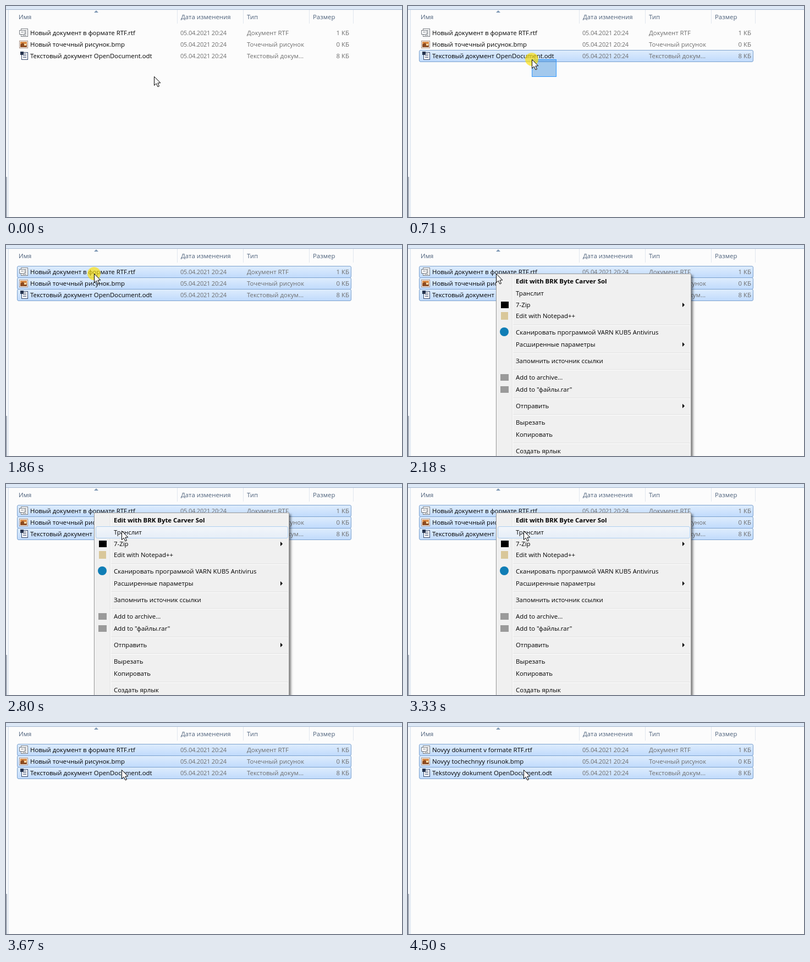
An HTML page with a canvas that plays this animation: 720 by 384 pixels, repeating every 8000 ms.

```html
<!DOCTYPE html>
<html lang="ru">
<head>
<meta charset="utf-8">
<title>Транслит</title>
<style>
html, body { margin: 0; width: 100%; height: 100%; overflow: hidden; background: #fcfcfc; }
canvas { display: block; width: 720px; height: 384px; }
</style>
</head>
<body>
<canvas id="stage" width="720" height="384"></canvas>
<script>
const c = document.getElementById('stage').getContext('2d');
const UI = '"Open Sans", "Noto Sans", sans-serif';
const LOOP = 8000;

const files = [
  ['Новый документ в формате RTF.rtf', 'Novyy dokument v formate RTF.rtf', 'Документ RTF', '1 КБ'],
  ['Новый точечный рисунок.bmp', 'Novyy tochechnyy risunok.bmp', 'Точечный рисунок', '0 КБ'],
  ['Текстовый документ OpenDocument.odt', 'Tekstovyy dokument OpenDocument.odt', 'Текстовый докум...', '8 КБ']
];
// label, centre y, icon, has submenu
const items = [
  ['Edit with BRK Byte Carver Sol', 66], ['Транслит', 88],
  ['7-Zip', 109, 'black', true], ['Edit with Notepad++', 129, 'note'],
  ['Сканировать программой VARN KUB5 Antivirus', 159, 'dot'],
  ['Расширенные параметры', 181, '', true], ['Запомнить источник ссылки', 211],
  ['Add to archive...', 241, 'box'], ['Add to "файлы.rar"', 263, 'box'],
  ['Отправить', 293, '', true], ['Вырезать', 323], ['Копировать', 345], ['Создать ярлык', 375]
];

const within = (t, a, b) => t >= a && t < b;
const mix = (a, b, k) => a + (b - a) * k;
const ease = k => (1 - Math.cos(Math.PI * k)) / 2;
// Progress 0..1 in n steps of 80 ms
const steps = (t, start, n) => Math.max(0, Math.min(n, Math.floor((t - start) / 80) + 1)) / n;

function rect(x, y, w, h, fill) {
  c.fillStyle = fill;
  c.fillRect(x, y, w, h);
}

function text(s, x, y, fill = '#000', opt = {}) {
  c.font = `${opt.bold ? 'bold ' : ''}${opt.size || 11.4}px ${opt.family || UI}`;
  c.textAlign = opt.align || 'left';
  c.letterSpacing = opt.spacing || '0px';
  c.fillStyle = fill;
  c.fillText(s, x, y);
}

function shape(points, fill) {
  c.beginPath();
  points.forEach(([x, y]) => c.lineTo(x, y));
  c.closePath();
  c.fillStyle = fill;
  c.fill();
}

function panel(x, y, w, h, top, bottom, line) {
  const g = c.createLinearGradient(0, y, 0, y + h);
  g.addColorStop(0, top);
  g.addColorStop(1, bottom);
  c.beginPath();
  c.roundRect(x + .5, y + .5, w, h, 2.5);
  c.fillStyle = g;
  c.fill();
  c.strokeStyle = line;
  c.lineWidth = 1;
  c.stroke();
}

function page(x, y, w, h, line) {
  rect(x, y, w, h, line);
  rect(x + 1, y + 1, w - 2, h - 2, '#fff');
  for (let i = 3; i < h - 2; i += 3) rect(x + 3, y + i, w - 6, 1, line);
}

function fileIcon(i) {
  if (i === 0) {
    page(27, 41, 13, 15, '#777c82');
    page(24, 44, 11, 8, '#777c82');
  } else if (i === 1) {
    rect(24, 63, 16, 14, '#a98f80');
    rect(25, 64, 14, 12, '#fff');
    rect(26, 65, 12, 10, '#d98a45');
    shape([[26, 75], [26, 70], [31, 67], [35, 72], [38, 70], [38, 75]], '#8c4a20');
    rect(33, 69, 4, 3, '#f7dfae');
  } else {
    page(28, 84, 12, 14, '#35476a');
    rect(26, 83, 6, 6, '#26344f');
  }
}

function backdrop() {
  rect(0, 0, 720, 384, '#fcfcfc');
  rect(0, 0, 720, 6, '#dce7f5');
  rect(0, 6, 720, 1, '#a3b5cd');
  rect(0, 7, 4, 377, '#f6f8fb');
  rect(4, 7, 1, 377, '#d6e0ec');
  rect(0, 311, 2, 73, '#a9b1bd');
  [311, 431, 551, 631].forEach(x => rect(x, 7, 1, 25, '#e2e7ee'));
  shape([[160, 12], [164, 8], [168, 12]], '#7d97b3');
  [['Имя', 23], ['Дата изменения', 318], ['Тип', 438], ['Размер', 558]]
    .forEach(([s, x]) => text(s, x, 24, '#4c607a'));
}

function fileList(t, cursorY) {
  files.forEach((file, i) => {
    const y = 38 + 21 * i;
    if (t >= 460 && cursorY <= y + 21 || t >= 1310)
      panel(20, y, 607, 21, '#dfedfd', '#c1dbfc', '#7da2ce');
  });
  files.forEach(([before, after, type, size], i) => {
    const y = 53 + 21 * i;
    fileIcon(i);
    text(t < 4500 ? before : after, 44, y);
    text('05.04.2021 20:24', 317, y, '#6d6d6d', { size: 11, spacing: '-0.2px' });
    text(type, 438, y, '#6d6d6d');
    text(size, 624, y, '#6d6d6d', { align: 'right' });
  });
}

function hover(y) {
  panel(163, y - 11, 349, 21, '#f3f6fa', '#e6eef8', '#aecff0');
}

function itemIcon(kind, y) {
  if (kind === 'black') rect(169, y - 6, 14, 12, '#000');
  if (kind === 'note') rect(169, y - 7, 13, 14, '#d9c79a');
  if (kind === 'box') rect(168, y - 6, 15, 12, '#9a9a9a');
  if (kind === 'dot') {
    c.beginPath();
    c.arc(175, y - 1, 8, 0, 7);
    c.fillStyle = '#0f7db5';
    c.fill();
  }
}

function menu(cursorY) {
  c.save();
  c.shadowColor = 'rgba(0,0,0,.5)';
  c.shadowBlur = 4;
  c.shadowOffsetX = c.shadowOffsetY = 3;
  rect(160, 52, 355, 360, '#979797');
  c.restore();
  rect(161, 53, 353, 340, '#f5f5f5');
  rect(162, 54, 351, 340, '#f0f0f0');
  rect(189, 55, 1, 340, '#e0e0e0');
  rect(190, 55, 1, 340, '#fff');
  [145, 196, 226, 278, 308, 360].forEach(y => {
    rect(191, y, 322, 1, '#e0e0e0');
    rect(191, y + 1, 322, 1, '#fff');
  });
  if (cursorY >= 55) hover(cursorY < 77 ? 66 : 88);
  items.forEach(([label, y, icon, more], i) => {
    itemIcon(icon, y);
    text(label, 196, y + 4, '#000', { bold: i === 0 });
    if (more) shape([[499, y - 4], [503, y], [499, y + 4]], '#000');
  });
}

// Tilted console window hanging off the top left of the stage
function pane(right, bottom, dark, glass, bar) {
  const low = bottom - 9;
  const outline = (inset, top, floor, radius) => {
    c.moveTo(-9, top);
    c.lineTo(right - inset - 13, top);
    c.arcTo(right - inset, floor, -9, floor + 2, radius);
    c.lineTo(-9, floor + 2);
    c.closePath();
  };
  c.save();
  c.shadowColor = 'rgba(0,0,0,.45)';
  c.shadowBlur = 14;
  c.shadowOffsetX = c.shadowOffsetY = 5;
  c.beginPath();
  outline(0, -9, bottom, 7);
  outline(8, 13, low, 1);
  c.fillStyle = glass;
  c.fill('evenodd');
  c.restore();

  c.beginPath();
  outline(0, -9, bottom, 7);
  c.strokeStyle = 'rgba(70,95,112,.45)';
  c.lineWidth = 1;
  c.stroke();

  c.beginPath();
  outline(23, 13, low, 1);
  c.fillStyle = `rgba(0,0,0,${dark})`;
  c.fill();

  shape([[right - 35, 13], [right - 20, 13], [right - 8, low], [right - 23, low]], `rgba(244,244,244,${bar})`);
  const arrow = (x, y, d) => shape([[x - 3, y], [x + 3, y], [x, y + d]], '#777');
  arrow(right - 27, 24, -4);
  arrow(right - 16, bottom - 18, 4);
  c.strokeStyle = 'rgba(120,120,120,.6)';
  c.strokeRect(right - 32.5, 31.5, 11, 17);
}

function consoleWindow(t) {
  const blue = 'rgba(150,190,212,.75)', grey = 'rgba(95,106,114,.35)';
  if (within(t, 3520, 3590)) {
    pane(546, 310, .46, blue, .85);
    pane(520, 284, .38, grey, .3);
    pane(494, 261, .38, grey, .25);
    text('App\\Projects\\Translit\\translit.exe', 20, 2, 'rgba(0,0,0,.6)');
    text(files[2][0] + ' --> ' + files[2][1], 473, 23, '#c4c4c4',
      { family: '"Liberation Mono", monospace', size: 12.5, bold: true, align: 'right' });
  } else if (within(t, 3590, 3670)) {
    c.globalAlpha = .35;
    pane(546, 310, .6, blue, .85);
    c.globalAlpha = 1;
  }
}

function cursor(x, y, lit) {
  if (lit) {
    c.beginPath();
    c.arc(x, y, 12, 0, 7);
    c.fillStyle = 'rgba(255,225,0,.65)';
    c.fill();
  }
  c.save();
  c.translate(x + .5, y + .5);
  shape([[0, 0], [0, 16], [3.7, 12.6], [6.5, 18.5], [9, 17.4], [6.4, 11.6], [11.3, 11.4]], '#fff');
  c.strokeStyle = '#000';
  c.lineWidth = 1;
  c.stroke();
  c.restore();
}

function draw(t) {
  const drag = ease(steps(t, 460, 9)), walk = ease(steps(t, 2480, 5));
  const x = Math.round(t < 1400 ? mix(269, 162, drag) : mix(160, 210, walk));
  const y = Math.round(t < 1400 ? mix(128, 52, drag) : mix(52, 85, walk));

  backdrop();
  fileList(t, y);

  if (within(t, 460, 1310)) {
    rect(x, y, 269 - x, 128 - y, 'rgba(40,130,215,.42)');
    c.strokeStyle = '#3399ff';
    c.lineWidth = 1;
    c.strokeRect(x + .5, y + .5, 269 - x, 128 - y);
  }
  if (within(t, 2100, 3420)) {
    c.globalAlpha = t < 2180 ? .6 : 1;
    menu(y);
    c.globalAlpha = 1;
  }
  consoleWindow(t);

  // The chosen item lingers after the menu closes
  if (within(t, 3420, 3670)) {
    c.globalAlpha = t < 3520 ? .8 : t < 3590 ? .36 : .15;
    hover(88);
    c.globalAlpha = Math.min(1, c.globalAlpha * 2);
    text('Транслит', 196, 92);
    c.globalAlpha = 1;
  }
  cursor(x, y, within(t, 300, 1310) || within(t, 1860, 2010) || within(t, 3170, 3330));
}

function tick() {
  draw(performance.now() % LOOP);
  requestAnimationFrame(tick);
}
tick();
</script>
</body>
</html>
```
